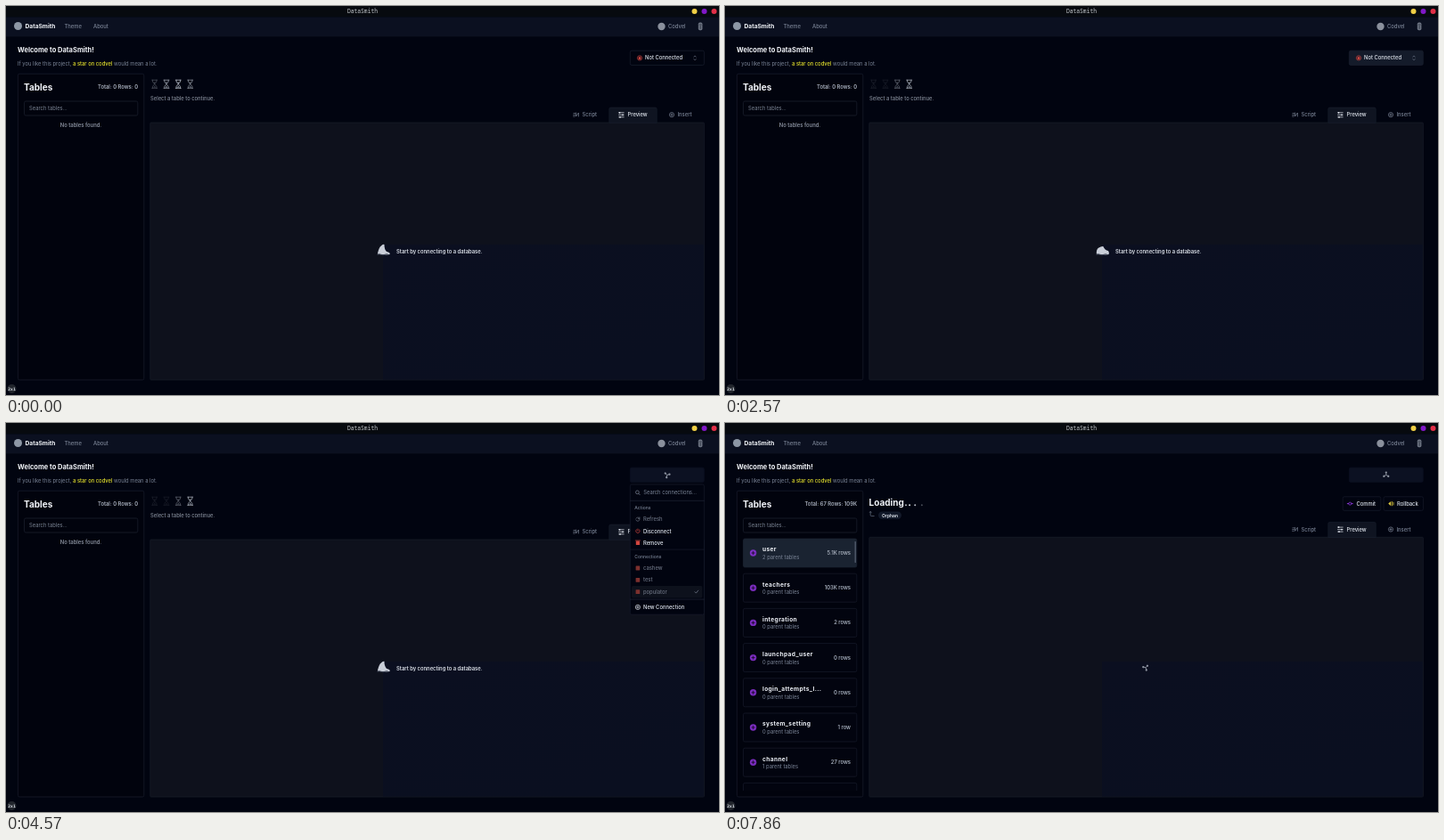
An HTML page for the animation above (8000 ms loop, 800 by 437 pixels).

```html
<!DOCTYPE html>
<html lang="en">
<head>
<meta charset="utf-8">
<title>DataSmith</title>
<style>
  html, body { margin: 0; width: 100%; height: 100%; overflow: hidden; background: #010410; }
  svg { display: block; width: 100vw; height: 100vh; font-family: Inter, sans-serif; }
</style>
</head>
<body>
<svg id="stage" viewBox="0 0 800 437"></svg>
<script>
const LOOP = 8000, FPS = 7;
const INK = '#e3e8f0', MUTED = '#7b8496', DIM = '#6a7180', LINE = '#171c2b', RED = '#d2453f';
const stage = document.getElementById('stage');

// y is the vertical middle of the text line
const text = (x, y, label, { size = 5.83, fill = INK, weight = 500, anchor = 'start', extra = '' } = {}) =>
  `<text x="${x}" y="${y + size * .36}" font-size="${size}" font-weight="${weight}" fill="${fill}" text-anchor="${anchor}" ${extra}>${label}</text>`;
const box = (x, y, w, h, fill = 'none', stroke = 'none', r = 1.7) =>
  `<rect x="${x}" y="${y}" width="${w}" height="${h}" rx="${r}" fill="${fill}" stroke="${stroke}" stroke-width=".7"/>`;
const disc = (x, y, r, fill) => `<circle cx="${x}" cy="${y}" r="${r}" fill="${fill}"/>`;
const line = (d, stroke = MUTED, width = .7) =>
  `<path d="${d}" fill="none" stroke="${stroke}" stroke-width="${width}" stroke-linecap="round" stroke-linejoin="round"/>`;
const ring = (x, y, r, stroke) => `<circle cx="${x}" cy="${y}" r="${r}" fill="none" stroke="${stroke}" stroke-width=".7"/>`;
const plusRing = (x, y, stroke) => ring(x, y, 2.6, stroke) + line(`M${x - 1.2} ${y}h2.4M${x} ${y - 1.2}v2.4`, stroke);
const group = (id, content, attrs = '') => `<g id="${id}" ${attrs}>${content}</g>`;

const frameChrome = () =>
  box(0, 0, 800, 437, '#010410', 'none', 0) +
  box(0, 0, 800, 12.5, '#070a0f', 'none', 0) +
  text(400, 5.6, 'DataSmith', { size: 6.3, weight: 400, fill: '#c3c7cb', anchor: 'middle', extra: 'font-family="Noto Sans Mono, monospace"' }) +
  disc(772.5, 6, 3, '#f0cf45') + disc(783.5, 6, 3, '#8018c8') + disc(794.5, 6, 3, '#e22f48') +
  box(0, 12.5, 800, 21, '#0b1020', 'none', 0) + line('M0 33.8H800', '#151a2a') +
  disc(13.5, 22.5, 4.5, '#8d97a5') +
  text(21.5, 23, 'DataSmith', { size: 6.67, weight: 700, fill: '#f1f4f8' }) +
  text(65.5, 23, 'Theme', { fill: MUTED }) + text(98, 23, 'About', { fill: MUTED }) +
  disc(735.5, 23, 4.2, '#8a909c') + text(743, 23, 'Codvel', { fill: MUTED }) +
  `<rect x="776.8" y="18.6" width="4.6" height="8.6" rx="1.6" fill="#6d7482"/>` + line('M778 21h2.2M779.1 22.5v3', '#1b2130') +
  text(13, 49.6, 'Welcome to DataSmith!', { size: 7.5, weight: 700, fill: '#f3f5f9' }) +
  text(13, 65, 'If you like this project, <tspan fill="#e9e52d" font-weight="500">a star on codvel</tspan> would mean a lot.', { fill: MUTED, weight: 400 }) +
  box(13.4, 76.2, 141.4, 343.8, '#01030d', '#1a1f2e') +
  text(20, 91.3, 'Tables', { size: 10, weight: 700, fill: '#f3f5f9' }) +
  box(20.5, 107, 127.3, 16, '#01030d', '#1d2332') +
  text(26, 115, 'Search tables...', { fill: '#7a8392', weight: 400 }) +
  disc(6.5, 430, 5, '#22262d') +
  text(6.5, 430, '2x1', { size: 4.6, weight: 700, anchor: 'middle', extra: 'font-family="DejaVu Sans Mono, monospace"' });

const hourglass = x => group('', line(
  `M${x - 3} 83.2h6M${x - 3} 92.3h6M${x - 2.2} 83.2v1.9l2.2 2.6l2.2-2.6v-1.9M${x - 2.2} 92.3v-1.9l2.2-2.7l2.2 2.7v1.9`, '#c6ccd6', .75) +
  `<path d="M${x - 1.3} 85.7h2.6l-1.3 1.5zM${x - 1.4} 91.6l1.4-1.7l1.4 1.7z" fill="#c6ccd6"/>`, 'class="glass"');

const emptyState = () => group('empty',
  text(148, 91.3, 'Total: 0 Rows: 0', { weight: 600, fill: '#aab1bd', anchor: 'end' }) +
  text(84, 134, 'No tables found.', { weight: 600, fill: '#888f9c', anchor: 'middle' }) +
  [166.7, 180, 193.3, 206.7].map(hourglass).join('') +
  text(162, 103.5, 'Select a table to continue.', { fill: '#858c99' }));

const preview = () => group('pane', '') + group('tabs',
  line('M637 120.5h1.5M636.7 122.3h1.8M639.6 120v4l2.8-4v4M636.7 124h1.5', MUTED) +
  text(646.5, 122.2, 'Script', { fill: MUTED }) +
  `<path d="M676.8 131.2v-15.4q0-1.7 1.7-1.7h50q1.7 0 1.7 1.7v15.4z" fill="#0f1421" stroke="#1a2030" stroke-width=".6"/>` +
  line('M687.6 119.8h5.6M687.6 122.3h5.6M687.6 124.8h5.6', INK) +
  [[688.5, 119.8], [692, 122.3], [689, 124.8]].map(([x, y]) => disc(x, y, .9, INK)).join('') +
  text(697.5, 122.2, 'Preview') +
  plusRing(747, 122.2, MUTED) + text(753.5, 122.2, 'Insert', { fill: MUTED }));

const startHint = () => group('hint',
  '<path id="fin" fill="#c9ced8"/>' + line('M417 279.3q2-1 4 0t4 0t4 0', '#343b4c', 1) +
  text(438, 275.6, 'Start by connecting to a database.', { weight: 600, fill: '#dce1e9' }));

const rows = [
  ['user', 2, '5.1K rows'], ['teachers', 0, '103K rows'], ['integration', 0, '2 rows'],
  ['launchpad_user', 0, '0 rows'], ['login_attempts_l...', 0, '0 rows'],
  ['system_setting', 0, '1 row'], ['channel', 1, '27 rows'], ['', 0, '']
];
const tableRow = ([name, parents, count], i) => {
  const y = 130 + i * 39.2;
  const frame = i ? box(20.5, y, 127.3, 32, '#02040f', LINE) : `<rect id="firstRow" x="20.5" y="${y}" width="127.3" height="32" rx="1.7" stroke="#1c2433" stroke-width=".7"/>`;
  if (!name) return frame;
  return frame +
    group('', disc(31.6, y + 16, 3.7, '#8b32d6') + line(`M30 ${y + 16}h3.2M31.6 ${y + 14.4}v3.2`, '#12091e', .8), 'class="mark"') +
    text(42, y + 11.9, name, { size: 6.67, weight: 700, fill: '#eef1f6', extra: 'letter-spacing=".33"' }) +
    text(42, y + 21, `${parents} parent tables`, { fill: MUTED, weight: 400 }) +
    text(141, y + 16, count, { weight: 600, fill: '#a5adba', anchor: 'end' });
};

const tableList = () => group('tables',
  text(148, 91.3, 'Total: 67 Rows: 109K', { weight: 600, fill: '#aab1bd', anchor: 'end' }) +
  '<clipPath id="listClip"><rect x="20" y="129" width="129" height="284"/></clipPath>' +
  group('', rows.map(tableRow).join('') + box(145.6, 133, 1.2, 24, '#596273', 'none', .6), 'clip-path="url(#listClip)"'));

const loadingHeader = () => group('loading',
  text(161.5, 89.4, 'Loading', { size: 10, weight: 700, fill: '#f1f4f8' }) +
  Array.from({ length: 4 }, () => '<circle class="dot" cy="92.2" r="1" fill="#dfe4ec"/>').join('') +
  line('M163.2 99.5v4q0 1 1 1h3M162.3 100.5l.9-1l.9 1', '#687080') +
  box(172, 99.6, 26, 8.4, '#121929', 'none', 4.2) +
  text(185, 103.8, 'Orphan', { size: 5, weight: 600, anchor: 'middle' }) +
  box(693.2, 82.8, 42.6, 15.5, '#010410', LINE) +
  ring(701.3, 90.6, 1.5, '#9a3df0') + line('M698.3 90.6h1.4M702.9 90.6h1.4', '#9a3df0', .9) + text(708.5, 90.6, 'Commit') +
  box(739, 82.8, 44.4, 15.5, '#010410', LINE) +
  '<path d="M744.2 90.6l3-2.6v5.2z" fill="#d8c23c"/>' + line('M748.4 88.4v4.4M750 89.2v2.8', '#d8c23c', .8) + text(754, 90.6, 'Rollback'));

const blades = (id, x, y) => group(id, [0, 120, 240].map(a =>
  `<path d="M0 0L2.4 0" stroke="#8c929f" stroke-width=".9" transform="rotate(${a})"/><circle cx="2.8" r="1.15" fill="#8c929f" transform="rotate(${a})"/>`).join(''),
  `data-x="${x}" data-y="${y}"`);

const connectButton = () => group('button', '<rect id="buttonBox" x="700.3" y="50.2" width="83" height="16.2" rx="1.7" stroke-width=".7"/>' +
  group('status', ring(711, 58.4, 2.6, RED) + disc(711, 58.4, 1.5, RED) +
    text(717, 58.4, 'Not Connected') + line('M771.8 57.2l1.2-1.3l1.2 1.3M771.8 59.6l1.2 1.3l1.2-1.3', '#7b8496', .6)));

const refreshIcon = (y, c) => line(`M706.9 ${y - 1}a2.1 2.1 0 1 1 -.1 1.7M710.9 ${y - 2.3}v1.5h-1.5`, c);
const menu = (active, connecting) => {
  const drop = connecting ? 26.7 : 0;
  const itemInk = connecting ? DIM : INK;
  const items = ['cashew', 'test', 'populator'].map((name, i) => {
    const y = 136.3 + i * 13.35 + drop;
    return (i === active ? box(702, y - 6.7, 79.3, 13.4, connecting ? '#0d111c' : '#161d2a') : '') +
      box(706.6, y - 2.4, 4.6, 4.8, connecting ? '#7c302e' : RED, 'none', .4) +
      text(715, y, name, { fill: itemInk }) +
      (connecting && i === active ? line(`M773 ${y}l1.3 1.4l2.4-3`, MUTED) : '');
  }).join('');
  const extraActions = connecting
    ? line('M708.9 119v2.2M707.3 119.8a2.2 2.2 0 1 0 3.2 0', RED) + text(715, 121.5, 'Disconnect') +
      box(706.8, 132.6, 4.2, 4.4, RED, 'none', .5) + line('M706.3 132h5.2', RED) + text(715, 134.6, 'Remove')
    : '';
  return box(700.3, 69, 83, 119.5 + drop, '#010410', LINE) +
    ring(708.4, 77.8, 1.9, MUTED) + line('M709.8 79.3l1.4 1.4') +
    (connecting ? '' : line('M715 75v6', '#a6adba', .5)) +
    text(715.2, 78.2, 'Search connections...', { fill: MUTED, weight: 400 }) +
    line('M700.3 87.3h83', '#202636') +
    text(705.3, 95.3, 'Actions', { size: 5, fill: MUTED }) +
    refreshIcon(108.2, itemInk) + text(715, 108.2, 'Refresh', { fill: itemInk }) + extraActions +
    line(`M700.3 ${115.4 + drop}h83`, LINE) +
    text(705.3, 123.8 + drop, 'Connections', { size: 5, fill: MUTED }) + items +
    line(`M700.3 ${171.4 + drop}h83`, '#202636') +
    plusRing(708.9, 180.2 + drop, INK) + text(715, 180.2 + drop, 'New Connection');
};

stage.innerHTML =
  '<defs><linearGradient id="glow" x2=".6" y2="1"><stop stop-color="#0b0f20"/><stop offset="1" stop-color="#0a0f20"/></linearGradient></defs>' +
  frameChrome() + emptyState() + preview() + startHint() + tableList() + loadingHeader() +
  connectButton() + blades('buttonSpin', 741.8, 58.4) + blades('paneSpin', 472, 274.8) + group('menu', '');

const $ = id => document.getElementById(id);
const all = name => [...document.querySelectorAll('.' + name)];
const glasses = all('glass'), marks = all('mark'), dots = all('dot');
const show = (id, on) => $(id).setAttribute('display', on ? 'inline' : 'none');
const wave = turns => .5 + .5 * Math.cos(2 * Math.PI * turns);
const mix = (a, b, k) => a + (b - a) * k;
const spin = (id, angle) => {
  const g = $(id);
  g.setAttribute('transform', `translate(${g.dataset.x} ${g.dataset.y}) rotate(${angle})`);
};

const setContent = (id, content) => {
  const g = $(id);
  if (g.content !== content) g.innerHTML = g.content = content;
};

function finPath(rise) {
  const top = mix(270.2, 267.8, rise), notch = mix(274.2, 273, rise), shoulder = mix(419, 421, rise);
  return `M416.8 278.6Q${shoulder - 2.4} ${top + 3} ${shoulder} ${top + 1.6}Q422.5 ${top - .5} 424.5 ${top}` +
    `Q${mix(426, 424.2, rise)} ${notch} ${mix(430, 427, rise)} ${mix(275, 276, rise)}Q431.5 277 430.6 279Q424 280.4 416.8 278.6Z`;
}

function draw(t) {
  const connecting = t >= 3.7, loaded = t >= 6, selected = t >= 6.25;
  const menuOpen = t >= 2.7 && t < 5.1;
  const hovered = t >= 1.7 && t < 2.7;
  const top = selected ? 128.3 : 131;

  show('empty', !loaded);
  show('hint', !selected);
  show('tables', loaded);
  show('loading', selected);
  show('status', !connecting);
  show('buttonSpin', connecting);
  show('paneSpin', selected);
  show('menu', menuOpen);

  setContent('pane', box(161.8, top, 621.6, 420 - top, '#0e111c', '#191e2a', 1) + box(423, 268, 360, 151.6, 'url(#glow)', 'none', 0));
  $('tabs').setAttribute('transform', `translate(0 ${top - 131})`);
  $('buttonBox').setAttribute('fill', connecting ? '#0c1122' : hovered ? '#141b2a' : '#010410');
  $('buttonBox').setAttribute('stroke', connecting ? '#0c1122' : '#1a2030');
  $('firstRow').setAttribute('fill', loaded ? '#1a2331' : 'none');
  if (menuOpen) setContent('menu', menu(t < 3.25 ? 0 : t < 3.4 ? 1 : 2, connecting));

  glasses.forEach((g, i) => g.setAttribute('opacity', mix(.06, .95, wave(t / 2 - .7 - .16 * i))));
  $('fin').setAttribute('d', finPath(1 - wave((t - 2.57) / 4.5)));
  marks.forEach(g => g.setAttribute('opacity', mix(.8, 1, wave((t - 6.43) / 2))));
  dots.forEach((dot, i) => {
    const u = (t / 1.07 + i / 4) % 1;
    dot.setAttribute('cx', 202.3 + 24 * u ** 1.5);
    dot.setAttribute('opacity', Math.min(1, .4 + u * 4, Math.max(0, (1 - u) * 2)));
  });
  spin('buttonSpin', 30 + 270 * (t - 27 / 7));
  spin('paneSpin', 48 + 270 * (t - 45 / 7));
}

function tick() {
  const ms = performance.now() % LOOP;
  draw(Math.floor(ms * FPS / 1000 + .05) / FPS);
  requestAnimationFrame(tick);
}
tick();
</script>
</body>
</html>
```
